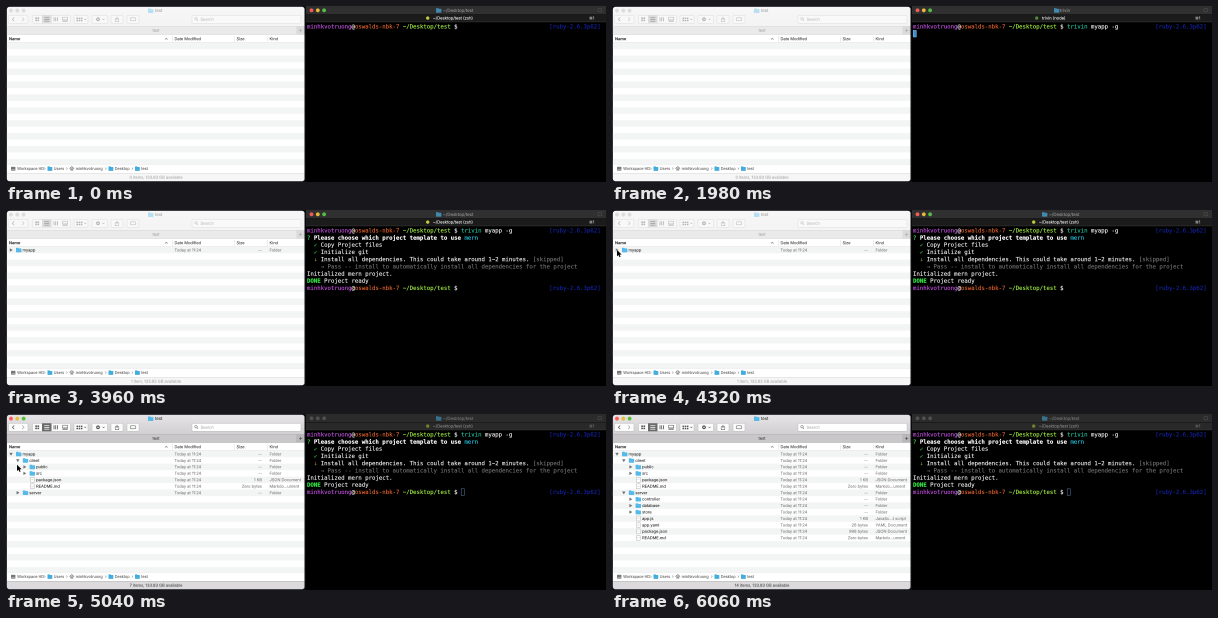
An HTML page with a canvas for the animation above (6420 ms loop, 600x176 px).

```html
<!DOCTYPE html>
<html lang="en">
<head>
<meta charset="utf-8">
<style>
  html, body { margin: 0; width: 100%; height: 100%; overflow: hidden; background: #000; }
  canvas { display: block; width: 600px; height: 176px; }
</style>
</head>
<body>
<canvas id="stage"></canvas>
<script>
const LOOP = 6420, STEP = 60;
const ratio = window.devicePixelRatio || 1;
const canvas = document.getElementById('stage');
canvas.width = 600 * ratio;
canvas.height = 176 * ratio;
const screen2d = canvas.getContext('2d');

// The scene is painted large and reduced, which keeps tiny text legible.
const DETAIL = 4;
const scene = document.createElement('canvas');
scene.width = 600 * DETAIL;
scene.height = 176 * DETAIL;
const ctx = scene.getContext('2d');
ctx.scale(DETAIL, DETAIL);
ctx.lineJoin = 'round';

const SANS = 'Inter, Roboto, sans-serif';
const MONO = '"DejaVu Sans Mono", monospace';
const USER = 'minhkvotruong', HOST = 'oswalds-nbk-7';

const ramp = (t, from, to) => Math.min(1, Math.max(0, (t - from) / (to - from)));
const mix = (a, b, p) => a + (b - a) * p;

// ---------- drawing helpers ----------
function rect(x, y, w, h, color) {
  ctx.fillStyle = color;
  ctx.fillRect(x, y, w, h);
}
function box(x, y, w, h, radius, fill, line) {
  ctx.beginPath();
  ctx.roundRect(x, y, w, h, radius);
  if (fill) { ctx.fillStyle = fill; ctx.fill(); }
  if (line) { ctx.strokeStyle = line; ctx.lineWidth = 0.5; ctx.stroke(); }
}
function dot(x, y, r, color) {
  ctx.beginPath();
  ctx.arc(x, y, r, 0, Math.PI * 2);
  ctx.fillStyle = color;
  ctx.fill();
}
function stroke(points, color, width = 0.7) {
  ctx.beginPath();
  points.forEach(([x, y]) => ctx.lineTo(x, y));
  ctx.strokeStyle = color;
  ctx.lineWidth = width;
  ctx.stroke();
}
// Laid out ten times larger, then scaled down, so small advances stay exact.
function text(str, x, y, color, { size = 4, align = 'left', weight = 400, family = SANS, bleed = 0.05 } = {}) {
  ctx.save();
  ctx.translate(x, y);
  ctx.scale(0.1, 0.1);
  ctx.font = `${weight} ${size * 10}px ${family}`;
  ctx.textAlign = align;
  ctx.fillStyle = ctx.strokeStyle = color;
  ctx.lineWidth = bleed * 10;
  ctx.fillText(str, 0, size * 3.6);
  ctx.strokeText(str, 0, size * 3.6);
  ctx.restore();
}
function folder(x, y, color = '#55b9e9', w = 5.4) {
  box(x, y - 2.2, w * 0.5, 2, 0.4, color);
  box(x, y - 1.6, w, 3.9, 0.5, color);
}
function trafficLights(x, y, colors) {
  colors.forEach((color, i) => dot(x + i * 6.3, y, 1.95, color));
}

// ---------- file browser ----------
const dir = (name, open, children) => ({ name, open, children, size: '--', kind: 'Folder' });
const file = (name, size, kind) => ({ name, size, kind, open: [0, 1], children: [] });
const closed = [1e6, 1e6 + 1];
const JSON_KIND = 'JSON Document', MD_KIND = 'Markdo...ument';
const tree = dir('myapp', [4440, 4560], [
  dir('client', [4740, 4920], [
    dir('public', closed, []),
    dir('src', closed, []),
    file('package.json', '1 KB', JSON_KIND),
    file('README.md', 'Zero bytes', MD_KIND),
  ]),
  dir('server', [5280, 5532], [
    dir('controller', closed, []),
    dir('database', closed, []),
    dir('store', closed, []),
    file('app.js', '1 KB', 'JavaSc...t script'),
    file('app.yaml', '26 bytes', 'YAML Document'),
    file('package.json', '996 bytes', JSON_KIND),
    file('README.md', 'Zero bytes', MD_KIND),
  ]),
]);
const ROW = 6.45, LIST_TOP = 36.8;
const MYAPP_AT = 3720, FOCUS_AT = 4380;

const countItems = (node, t) =>
  1 + (t >= node.open[0] ? node.children.reduce((n, c) => n + countItems(c, t), 0) : 0);
const openHeight = (node, t) =>
  ROW + ramp(t, ...node.open) * node.children.reduce((h, c) => h + openHeight(c, t), 0);

function drawNode(node, depth, top, t) {
  const y = top + ROW / 2, x = 10 + depth * 6.8;
  const p = ramp(t, ...node.open);
  if (node.kind === 'Folder') {
    ctx.save();
    ctx.translate(x - 5, y);
    ctx.rotate(p * Math.PI / 2);
    ctx.beginPath();
    ctx.moveTo(-1.2, -1.7); ctx.lineTo(1.7, 0); ctx.lineTo(-1.2, 1.7);
    ctx.fillStyle = '#707070';
    ctx.fill();
    ctx.restore();
    folder(x, y);
  } else {
    box(x + 0.8, y - 2.4, 3.8, 4.8, 0.2, '#fff', '#b4b4b4');
    stroke([[x + 1.6, y], [x + 3.8, y]], '#bbb', 0.4);
  }
  text(node.name, x + 6.5, y, '#222');
  text('Today at 11:24', 168.5, y, '#777');
  text(node.size, 256, y, '#777', { align: 'right' });
  text(node.kind, 263.5, y, '#777');

  if (p > 0 && node.children.length) {
    const full = node.children.reduce((h, c) => h + openHeight(c, t), 0);
    ctx.save();
    ctx.beginPath();
    ctx.rect(0, top + ROW, 299, full * p);
    ctx.clip();
    let childTop = top + ROW - full * (1 - p);
    for (const child of node.children) {
      drawNode(child, depth + 1, childTop, t);
      childTop += openHeight(child, t);
    }
    ctx.restore();
  }
}

function drawToolbar(active) {
  const ink = active ? '#555' : '#b5b5b5';
  const face = active ? '#fbfbfb' : '#f8f8f8';
  const edge = active ? '#bcbcbc' : '#dedede';
  const button = (x, w) => box(x, 9.3, w, 8, 1, face, edge);
  button(2.5, 19.5);
  stroke([[8.2, 11.5], [6.4, 13.3], [8.2, 15.1]], ink);
  stroke([[16.2, 11.5], [18, 13.3], [16.2, 15.1]], active ? '#aaa' : '#ccc');
  button(26.5, 38);
  rect(36, 9.3, 9.5, 8, active ? '#6b6b6b' : '#dcdcdc');
  for (let i = 0; i < 4; i++) rect(29.3 + (i % 2) * 2.2, 11.4 + (i >> 1) * 2.2, 1.6, 1.6, ink);
  for (let i = 0; i < 3; i++) {
    rect(38.3, 11.4 + i * 1.7, 5, 0.7, active ? '#fff' : '#999');
    rect(47.6 + i * 1.7, 11.3, 0.8, 4, ink);
  }
  box(56.5, 11.2, 5.2, 2.7, 0.2, null, ink);
  rect(56.4, 14.6, 5.4, 1, ink);
  button(68, 14);
  for (let i = 0; i < 6; i++) rect(70.5 + (i % 3) * 2.2, 11.6 + Math.floor(i / 3) * 2.2, 1.5, 1.5, ink);
  button(86, 15.5);
  dot(92, 13.3, 1.9, ink);
  dot(92, 13.3, 0.7, face);
  for (const x of [79.3, 97.5]) stroke([[x - 1, 12.8], [x, 13.8], [x + 1, 12.8]], ink, 0.5);
  button(105, 12);
  box(109.2, 12.7, 3.6, 3, 0.2, null, ink);
  stroke([[111, 14], [111, 10.8]], ink, 0.6);
  button(121, 12);
  box(124.2, 11.8, 5.6, 3, 1, null, ink);
  box(186, 9.3, 109, 8, 1, active ? '#fff' : '#f9f9f9', edge);
  ctx.beginPath();
  ctx.arc(190, 12.8, 1.2, 0, 7);
  ctx.strokeStyle = ink;
  ctx.lineWidth = 0.5;
  ctx.stroke();
  stroke([[190.9, 13.7], [192, 14.8]], ink, 0.5);
  text('Search', 194.5, 13.3, active ? '#aaa' : '#bbb');
}

function drawPathBar() {
  const y = 162.6;
  const parts = [['Workspace HD', 5], ['Users', 41.5], [USER, 63.5], ['Desktop', 102.5], ['test', 129]];
  parts.forEach(([name, x], i) => {
    if (i === 0) {
      box(x, y - 1.8, 4.4, 3.8, 0.5, '#777');
      rect(x + 0.5, y + 0.6, 3.4, 0.7, '#bbb');
    } else if (i === 2) {
      stroke([[x, y], [x + 2.3, y - 2], [x + 4.6, y]], '#777', 0.7);
      rect(x + 0.9, y - 0.3, 2.8, 2.3, '#999');
    } else {
      folder(x, y, '#42aede', 4.8);
    }
    text(name, x + 6.2, y, '#555', { size: 3.8 });
    if (i) stroke([[x - 3.2, y - 1], [x - 2.2, y], [x - 3.2, y + 1]], '#888', 0.5);
  });
}

function drawBrowser(t) {
  const active = t >= FOCUS_AT;
  const line = active ? '#b2b2b2' : '#d8d8d8';
  const ink = active ? '#333' : '#a0a0a0';
  ctx.save();
  ctx.beginPath();
  ctx.roundRect(0.9, 0.9, 297.6, 174.3, 2.5);
  ctx.clip();

  rect(0, 0, 299, 176, '#fff');
  const bar = ctx.createLinearGradient(0, 0, 0, 20);
  bar.addColorStop(0, active ? '#e7e5e7' : '#f7f7f7');
  bar.addColorStop(1, active ? '#d2d0d2' : '#f4f4f4');
  rect(0, 0, 299, 20.5, bar);
  trafficLights(5, 4.6, active ? ['#fc5b57', '#e5bf3c', '#57c038'] : Array(3).fill('#dcdcdc'));
  folder(142, 4.7, active ? '#55b9e9' : '#b4dff4');
  text('test', 149, 4.6, ink, { size: 4.2 });
  drawToolbar(active);

  rect(0, 20, 299, 8.5, active ? '#c9c7c9' : '#eaeaea');
  rect(290.5, 20, 9, 8.5, active ? '#b9b7b9' : '#dadada');
  rect(0, 20, 299, 0.5, line);
  rect(0, 28.3, 299, 0.5, line);
  rect(290.5, 20, 0.5, 8.5, line);
  text('test', 150, 24.4, ink, { align: 'center' });
  stroke([[293.1, 24.4], [296.3, 24.4]], ink, 0.5);
  stroke([[294.7, 22.8], [294.7, 26]], ink, 0.5);

  text('Name', 3, 32.9, '#222', { weight: 600 });
  stroke([[159, 33.5], [160.3, 32.3], [161.6, 33.5]], '#777', 0.6);
  [['Date Modified', 168.5], ['Size', 230.5], ['Kind', 263.5]].forEach(([label, x]) => {
    text(label, x, 32.9, '#333');
    rect(x - 2.5, 30, 0.4, 6, '#d5d5d5');
  });
  rect(0, 36.4, 299, 0.4, '#d8d8d8');

  for (let i = 0; i < 19; i += 2) rect(0, LIST_TOP + i * ROW, 299, ROW, '#f3f4f4');
  if (t >= MYAPP_AT) drawNode(tree, 0, LIST_TOP, t);

  rect(0, 158, 299, 9, '#fff');
  rect(0, 158, 299, 0.4, '#dcdcdc');
  drawPathBar();
  rect(0, 167, 299, 9, active ? '#dcdadc' : '#f6f6f6');
  rect(0, 167, 299, 0.5, line);
  const items = t >= MYAPP_AT ? countItems(tree, t) : 0;
  text(`${items} item${items === 1 ? '' : 's'}, 133.83 GB available`, 150, 171.3,
    active ? '#444' : '#a5a5a5', { align: 'center' });
  ctx.restore();
}

// ---------- terminal ----------
const CELL = 3.422, TERM_X = 301, TERM_Y = 20.4, LINE = 7.2;
const C = { white: '#f2f2f2', user: '#c04fdc', host: '#e0622c', path: '#a4f244', teal: '#22c49f',
  cyan: '#25c2df', green: '#36ea4a', gray: '#707070', navy: '#1424a0' };
const RUN_AT = 1560, ASK_AT = 2280, ANSWER_AT = 2880, TASKS_AT = 3000, DONE_AT = 3060, PROMPT_AT = 3300;

// Prints [string, color, weight] parts and returns the next column.
function print(row, col, ...parts) {
  for (const [str, color, weight = 400] of parts) {
    text(str, TERM_X + col * CELL, TERM_Y + row * LINE, color,
      { size: 5.684, family: MONO, weight, bleed: 0.14 });
    col += str.length;
  }
  return col;
}
function printPrompt(row) {
  print(row, 70.8, ['[ruby-2.6.3p62]', C.navy]);
  return print(row, 0, [USER, C.user], ['@', C.white], [HOST, C.host], [' ', C.white],
    ['~/Desktop/test', C.path], [' $ ', C.white]);
}
function termCursor(row, col, hollow) {
  box(TERM_X + col * CELL + 0.2, TERM_Y + row * LINE - 3.2, CELL - 0.3, 6.6, 0,
    hollow ? null : '#3f8fd0', hollow ? '#5b7fa8' : '#7cc0f0');
}
function typedLength(t) {
  if (t < 60) return 0;
  if (t < 780) return Math.min(7, 1 + Math.floor((t - 60) / 100));
  return Math.min(15, 8 + Math.floor((t - 780) / 77));
}

function drawTermBars(t) {
  const active = t < FOCUS_AT;
  const running = t >= RUN_AT && t < PROMPT_AT;
  const ink = active ? '#9c9c9c' : '#808080';
  rect(300, 0, 300, 8.5, active ? '#303030' : '#2b2b2b');
  rect(300, 8.5, 300, 7.5, active ? '#1b1b1b' : '#292929');
  rect(300, 8.2, 300, 0.5, '#101010');
  rect(300, 15.7, 300, 0.5, '#3c3c3c');
  trafficLights(305.5, 4.3, active ? ['#f45b55', '#e6b83c', '#55bd45'] : Array(3).fill('#505050'));
  folder(running ? 442 : 430, 4.4, active ? '#4189ad' : '#39718c');
  text(running ? 'trivin' : '~/Desktop/test', running ? 448 : 437, 4.4, ink, { size: 4.3 });
  box(592, 2.7, 3.6, 3.2, 0.5, null, '#555');

  let tab = '~/Desktop/test (zsh)';
  if (running) tab = t < ASK_AT ? 'trivin (node)' : '~/Desktop/test (node)';
  const tabX = tab.startsWith('trivin') ? 430 : 427;
  const light = running ? '#4d8a3a' : '#c3cc38';
  dot(tabX - 5.3, 12.1, 1.7, active ? light : '#76802c');
  text(tab, tabX, 12.1, active ? '#f4f4f4' : '#8a8a8a', { size: 4.1, bleed: 0.1 });
  text('⌘1', 583, 12.1, active ? '#ddd' : '#777', { size: 3.8 });
}

function drawTerminal(t) {
  rect(299.5, 0, 301, 176, '#000');
  drawTermBars(t);

  const count = typedLength(t);
  const command = 'trivin myapp -g'.slice(0, count);
  const end = print(0, printPrompt(0), [command.slice(0, 6), C.teal], [command.slice(6), C.white]);
  if (t < RUN_AT) {
    if (t >= 60) termCursor(0, end, false);
    return;
  }
  if (t < ASK_AT) {
    if (t >= 1800) termCursor(1, 0, false);
    return;
  }

  const question = print(1, 0, ['? ', C.green], ['Please choose which project template to use ', '#fff', 700]);
  if (t < ANSWER_AT) {
    print(1, question, ['(Use arrow keys)', C.gray]);
    print(2, 0, ['❯ mern', C.cyan]);
    return;
  }
  print(1, question, ['mern', C.cyan]);

  if (t >= TASKS_AT) {
    print(2, 2, ['✔ ', '#237c30'], ['Copy Project files', C.white]);
    print(3, 2, ['✔ ', '#237c30'], ['Initialize git', C.white]);
    print(4, 2, ['↓ ', '#867d2c'],
      ['Install all dependencies. This could take around 1~2 minutes. ', C.white], ['[skipped]', C.gray]);
    print(5, 4, ['→ Pass -- install to automatically install all dependencies for the project', C.gray]);
  }
  if (t >= DONE_AT) {
    print(6, 0, ['Initialized mern project.', C.white]);
    print(7, 0, ['DONE', C.green, 700], [' Project ready', C.white]);
    if (t < PROMPT_AT) termCursor(8, 0, false);
  }
  if (t >= PROMPT_AT) {
    const col = printPrompt(8);
    if (t >= FOCUS_AT) termCursor(8, col, true);
    else if (t < 3660) termCursor(8, col, false);
  }
}

// ---------- pointer ----------
const pointerPath = [[3980, 60, 178], [4320, 5, 40], [4440, 5, 40], [4600, 8, 46],
  [4980, 11, 46], [5220, 11, 76.5], [5640, 11, 76.5], [5980, 60, 180]];

function drawPointer(t) {
  const next = pointerPath.findIndex(([time]) => time > t);
  if (next < 1) return;
  const [t0, x0, y0] = pointerPath[next - 1], [t1, x1, y1] = pointerPath[next];
  const s = ramp(t, t0, t1), p = s * s * (3 - 2 * s);
  ctx.save();
  ctx.translate(mix(x0, x1, p), mix(y0, y1, p));
  ctx.beginPath();
  [[0, 0], [0, 6.3], [1.5, 5], [2.5, 7.2], [3.6, 6.7], [2.6, 4.6], [4.6, 4.5]]
    .forEach(([x, y]) => ctx.lineTo(x, y));
  ctx.closePath();
  ctx.lineWidth = 0.8;
  ctx.strokeStyle = '#fff';
  ctx.stroke();
  ctx.fillStyle = '#000';
  ctx.fill();
  ctx.restore();
}

function frame() {
  const t = Math.floor((performance.now() - start) % LOOP / STEP) * STEP;
  rect(0, 0, 600, 176, '#10141a');
  drawTerminal(t);
  drawBrowser(t);
  drawPointer(t);
  screen2d.imageSmoothingQuality = 'high';
  screen2d.drawImage(scene, 0, 0, canvas.width, canvas.height);
  requestAnimationFrame(frame);
}
const start = performance.now();
frame();
</script>
</body>
</html>
```
